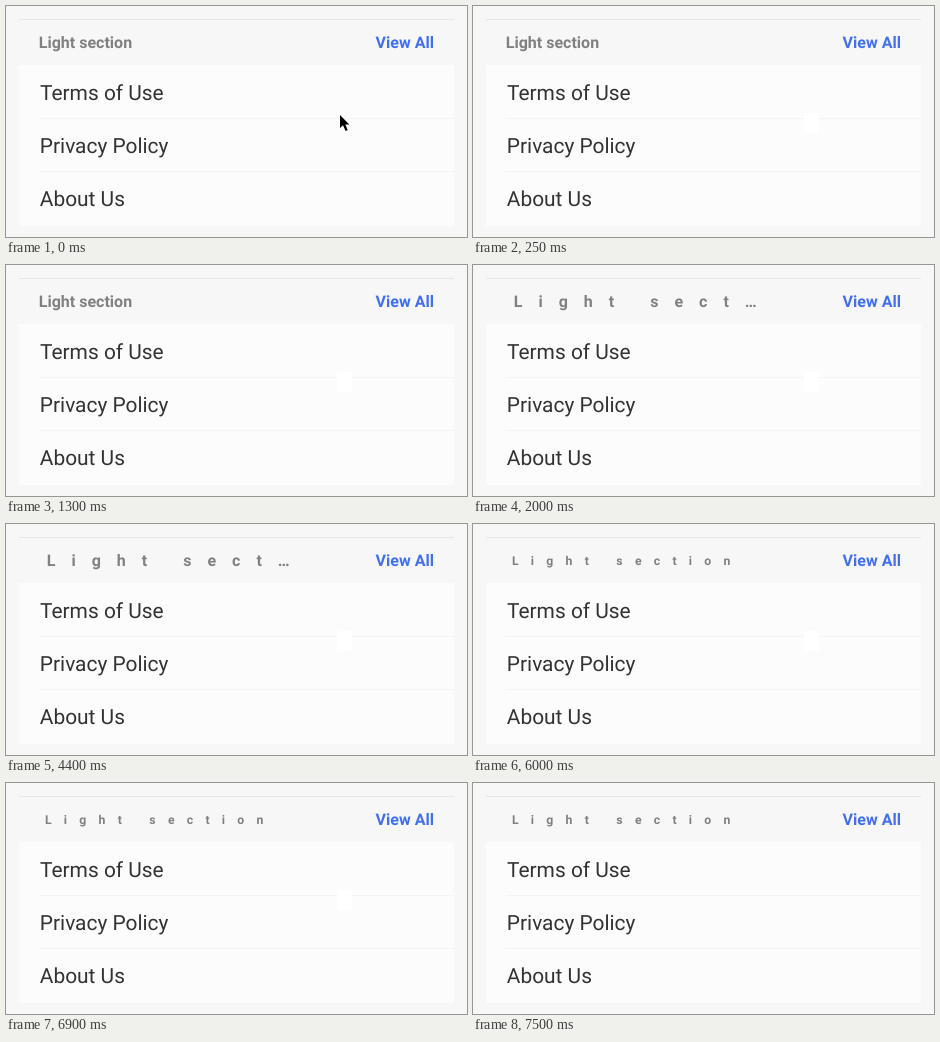
These frames come from a looping animation (461 px wide and 231 px high, 8 s). An HTML page:

```html
<!DOCTYPE html>
<html lang="en">
<head>
<meta charset="utf-8">
<title>Light section list</title>
<style>
  html, body { margin: 0; width: 100%; height: 100%; overflow: hidden; background: #f7f7f7; }
  svg { display: block; }
  text { font-family: Roboto, sans-serif; white-space: pre; text-rendering: geometricPrecision; }
  .row { font-size: 20.9px; fill: #333; }
  .head { font-size: 16px; font-weight: 700; }
</style>
</head>
<body>
<svg width="461" height="231" viewBox="0 0 461 231">
  <rect x="13" y="13" width="435" height="1" fill="#e6e6e6"/>
  <rect x="13" y="59" width="435" height="161" fill="#fcfcfc"/>
  <path d="M33 112.5H448M33 165.5H448" stroke="#f4f4f4"/>
  <text id="title" class="head" fill="#808080"></text>
  <text class="head" x="369.6" y="42" fill="#416ff0">View All</text>
  <text class="row" x="34" y="94">Terms of Use</text>
  <text class="row" x="33.8" y="147">Privacy Policy</text>
  <text class="row" x="33.8" y="200.4">About Us</text>
  <rect id="patch" x="331" y="107" width="15" height="20" fill="#fff"/>
  <path id="cursor" d="M334 109V122L337 119.2L339.5 125L341.7 124L339.3 118.4H343.3Z"
        stroke="#fff" stroke-width="1.6" paint-order="stroke"/>
</svg>
<script>
const LOOP = 8000;
const $ = id => document.getElementById(id);

// The title's letter spacing is split evenly on both sides of each glyph.
const titles = [
  { from: 0, text: 'Light section', size: 16, spacing: 0, y: 42 },
  { from: 2000, text: 'Light sect…', size: 16, spacing: 16, y: 42 },
  { from: 6000, text: 'Light section', size: 12.25, spacing: 12.25, y: 41 },
];

function show(id, visible) {
  $(id).style.visibility = visible ? 'visible' : 'hidden';
}

let current;
function setTitle(state) {
  if (state === current) return;
  current = state;
  const title = $('title');
  title.textContent = state.text;
  title.setAttribute('x', 32.8 + state.spacing / 2);
  title.setAttribute('y', state.y);
  title.style.fontSize = state.size + 'px';
  title.style.letterSpacing = state.spacing + 'px';
}

function render(now) {
  const t = now % LOOP;
  setTitle(titles.findLast(state => t >= state.from));
  show('cursor', t < 250);
  show('patch', t >= 250 && t < 7500);
  requestAnimationFrame(() => render(performance.now()));
}
render(performance.now());
</script>
</body>
</html>
```
